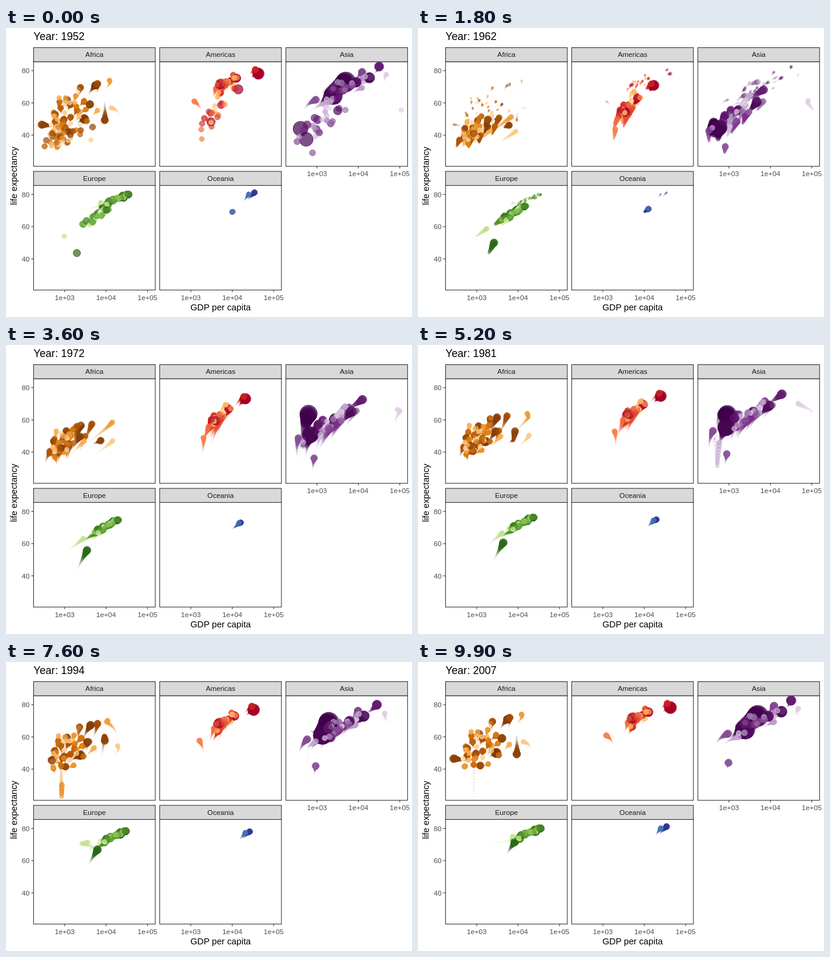
These frames come from a looping animation (672x480 px, 10 s). An HTML page with a canvas:

```html
<!DOCTYPE html>
<html lang="en">
<head>
<meta charset="utf-8">
<title>Life expectancy and GDP</title>
<style>
  html, body { margin: 0; width: 100%; height: 100%; overflow: hidden; background: #fff; }
  svg, canvas { position: absolute; left: 0; top: 0; width: 672px; height: 480px; }
  text { font-family: "Liberation Sans", Arial, sans-serif; }
</style>
</head>
<body>
<svg id="chart" viewBox="0 0 672 480"></svg>
<canvas id="dots" width="672" height="480"></canvas>
<script>
const FRAMES = 100, STEP = 100, WAKE = 50;
const PANEL = { left: 45.6, top: 56, w: 201.47, h: 173.7, dx: 208.8, dy: 205.5, strip: 23.4 };
const TEXT = 11.73, AXIS = 14.67, LINE = 1.07;

const panelX = col => PANEL.left + col * PANEL.dx;
const panelY = row => PANEL.top + row * PANEL.dy;
const xOf = (logGdp, col) => panelX(col) + (logGdp - 2.248) * 68.53;
const yOf = (life, row) => panelY(row) + PANEL.h - (life - 20.65) * 2.676;
const mix = (a, b, u) => a + (b - a) * u;

// Parabola through values at u = 0, 1/2 and 1.
const through = (a, b, c, u) =>
  a * (1 - u) * (1 - 2 * u) + b * 4 * u * (1 - u) + c * u * (2 * u - 1);

function seeded(seed) {
  return () => {
    seed = (seed * 16807) % 2147483647;
    return seed / 2147483647;
  };
}

function shade(stops, u) {
  const pos = u * (stops.length - 1), i = Math.min(Math.floor(pos), stops.length - 2);
  const part = (hex, k) => parseInt(hex.slice(1 + 2 * k, 3 + 2 * k), 16);
  const rgb = [0, 1, 2].map(k => Math.round(mix(part(stops[i], k), part(stops[i + 1], k), pos - i)));
  return `rgb(${rgb})`;
}

// The typical country lies between the poor and the rich end of its continent.
function typical(cont, rank, rnd) {
  const wealth = (cont.offset + rank * cont.step) % 1;
  const [g0, g2, l0, l2] = cont.poor.map((low, i) =>
    mix(low, cont.rich[i], mix(wealth, rnd(), cont.noise) ** cont.skew));
  return { gdp: [g0, mix(g0, g2, cont.gdpMid), g2], life: [l0, l2], bends: [] };
}

// Notable countries give GDP early, midway and late, life expectancy early and late,
// and any bends as year, half width, log GDP and life expectancy.
const notable = ([, g0, g1, g2, l0, l2, ...bends]) =>
  ({ gdp: [g0, g1, g2].map(Math.log10), life: [l0, l2], bends });

function makeTrack(cont, rank, country) {
  const pop = cont.top[rank] ?? cont.base * Math.exp(-cont.decay * (rank - cont.top.length));
  const [l0, l2] = country.life, l1 = mix(l0, l2, cont.lifeMid);
  const points = Array.from({ length: FRAMES }, (_, i) => {
    const u = i / (FRAMES - 1), year = 1952 + 55 * u;
    let gdp = through(...country.gdp, u), life = through(l0, l1, l2, u);
    for (const [mid, half, dGdp, dLife] of country.bends) {
      const k = Math.max(0, 1 - Math.abs(year - mid) / half);
      gdp += dGdp * k;
      life += dLife * k;
    }
    const size = 2 + 10 * Math.sqrt(pop * mix(cont.growth, 1, u) / 1318);
    return { x: xOf(gdp, cont.col), y: yOf(life, cont.row), size };
  });
  return { points, color: shade(cont.shades, rank / (cont.count - 1)) };
}

const chart = document.getElementById("chart");
function add(tag, attrs, content = "") {
  const el = document.createElementNS("http://www.w3.org/2000/svg", tag);
  for (const key in attrs) el.setAttribute(key, attrs[key]);
  el.textContent = content;
  chart.appendChild(el);
  return el;
}
const label = (content, x, y, size, fill, anchor = "middle", extra = {}) =>
  add("text", { x, y, "font-size": size, fill, "text-anchor": anchor, ...extra }, content);
const box = (x, y, width, height, fill) =>
  add("rect", { x, y, width, height, fill, stroke: "#333", "stroke-width": LINE });
const tick = (x1, y1, x2, y2) =>
  add("line", { x1, y1, x2, y2, stroke: "#333", "stroke-width": LINE });

function drawPanel({ name, col, row }) {
  const x = panelX(col), y = panelY(row);
  box(x, y, PANEL.w, PANEL.h, "#fff");
  box(x, y - PANEL.strip, PANEL.w, PANEL.strip, "#d9d9d9");
  label(name, x + PANEL.w / 2, y - 7.7, TEXT, "#1a1a1a");
}

function xAxis(col, row) {
  const bottom = panelY(row) + PANEL.h;
  for (let e = 3; e <= 5; e++) {
    const x = xOf(e, col);
    tick(x, bottom, x, bottom + 3.67);
    label("1e+0" + e, x, bottom + 16.3, TEXT, "#4d4d4d");
  }
}

function yAxis(row) {
  for (let life = 40; life <= 80; life += 20) {
    const y = yOf(life, row);
    tick(PANEL.left - 3.67, y, PANEL.left, y);
    label(life, PANEL.left - 6.6, y + 4.2, TEXT, "#4d4d4d", "end");
  }
}

// Countries are ranked by population, which sets both shade and size.
const tracks = [];
function addContinent(options) {
  const cont = { offset: .7, step: .618, noise: .35, skew: 1, top: [], notables: [], ...options };
  const rnd = seeded(4217);
  const countries = Array.from({ length: cont.count }, (_, rank) => typical(cont, rank, rnd));
  for (const row of cont.notables) countries[row[0]] = notable(row);
  for (let i = 0; i < cont.count; i++) {
    const rank = (i * 7) % cont.count;
    tracks.push(makeTrack(cont, rank, countries[rank]));
  }
  drawPanel(cont);
}

addContinent({
  name: "Africa", col: 0, row: 0, count: 52,
  shades: ["#7f3b08", "#b35806", "#e08214", "#fdb863", "#fee0b6"],
  top: [135, 80], base: 76, decay: .09, growth: .3,
  poor: [2.5, 2.6, 31, 41], rich: [3.45, 4.1, 52, 75],
  noise: .5, skew: 1.5, gdpMid: .65, lifeMid: .65,
  notables: [
    [1, 1419, 3000, 5581, 42, 71],
    [3, 781, 730, 278, 39, 46.5],
    [4, 4725, 8300, 9270, 45, 49.3, [1990, 16, 0, 12]],
    [9, 2449, 5300, 6223, 43, 72],
    [28, 493, 770, 863, 40, 46, [1992, 7, 0, -22]],
    [32, 2388, 19500, 12057, 43, 74, [1992, 15, -.33, 0]],
    [44, 4293, 18000, 13206, 37, 57]
  ]
});

addContinent({
  name: "Americas", col: 1, row: 0, count: 25,
  shades: ["#a50026", "#d73027", "#f46d43", "#fdae61", "#fee090"],
  top: [301, 190, 109], base: 46, decay: .14, growth: .45,
  poor: [3.2, 3.45, 38, 65], rich: [3.85, 4.25, 68, 79],
  gdpMid: .65, lifeMid: .63,
  notables: [
    [0, 13990, 24500, 42952, 68.4, 78.2],
    [5, 11367, 22500, 36319, 68.8, 80.7],
    [14, 1840, 1950, 1202, 37.6, 61]
  ]
});

addContinent({
  name: "Asia", col: 2, row: 0, count: 30,
  shades: ["#40004b", "#762a83", "#9970ab", "#c2a5cf", "#e7d4e8"],
  top: [1318, 1110], base: 223, decay: .15, growth: .4,
  poor: [2.6, 3.05, 36, 61], rich: [3.75, 4.6, 66, 82],
  skew: 1.2, gdpMid: .58, lifeMid: .64,
  notables: [
    [0, 400, 850, 4959, 44, 73, [1962, 5, 0, -8], [1972, 8, 0, 5.5]],
    [1, 547, 830, 2452, 37.4, 64.7],
    [5, 3217, 18000, 31656, 63, 82.6],
    [11, 331, 400, 944, 36, 62],
    [12, 779, 880, 975, 29, 44],
    [22, 368, 560, 1714, 39, 60, [1977, 6, 0, -20]],
    [28, 108382, 48000, 47307, 55.6, 77.6, [1970, 10, .25, 0]]
  ]
});

addContinent({
  name: "Europe", col: 0, row: 1, count: 30,
  shades: ["#276419", "#4d9221", "#7fbc41", "#b8e186", "#e6f5d0"],
  top: [82, 71, 61, 61, 58], base: 40, decay: .15, growth: .75,
  poor: [3.35, 3.85, 58, 72.5], rich: [4.1, 4.63, 73, 81.3],
  noise: .2, skew: .85, gdpMid: .65, lifeMid: .58,
  notables: [
    [1, 1969, 4250, 8458, 43.6, 71.8],
    [23, 974, 3900, 7446, 54, 75, [1992, 6, -.35, 0]]
  ]
});

addContinent({
  name: "Oceania", col: 1, row: 1, count: 2,
  shades: ["#313695", "#4575b4"],
  top: [20, 4], growth: .45, offset: 0, step: .99, noise: 0,
  poor: [4, 4.54, 69.1, 81.2], rich: [4.02, 4.4, 69.4, 80.2],
  gdpMid: .52, lifeMid: .46
});

xAxis(2, 0);
xAxis(0, 1);
xAxis(1, 1);
yAxis(0);
yAxis(1);
label("GDP per capita", 355.2, 469, AXIS, "#000");
label("life expectancy", 0, 0, AXIS, "#000", "middle", { transform: "translate(18 245.6) rotate(-90)" });
const title = label("", PANEL.left, 20, 17.6, "#000", "start");

const ctx = document.getElementById("dots").getContext("2d");
ctx.lineWidth = .945;

function drawDots(frame, fade) {
  ctx.globalAlpha = .7 * fade;
  for (const { points, color } of tracks) {
    const { x, y, size } = points[frame];
    ctx.fillStyle = ctx.strokeStyle = color;
    ctx.beginPath();
    ctx.arc(x, y, (size * fade * 2.845 + .945) / 2, 0, 2 * Math.PI);
    ctx.fill();
    ctx.stroke();
  }
}

function draw(frame) {
  title.textContent = "Year: " + Math.round(1952 + 55 * frame / (FRAMES - 1));
  ctx.clearRect(0, 0, 672, 480);
  // The wake wraps around, so the start of the loop still shows the end.
  for (let age = WAKE; age >= 0; age--) {
    drawDots((frame - age + FRAMES) % FRAMES, (1 - age / (WAKE + 1)) ** 3);
  }
}

const start = performance.now();
let shown = -1;
function update() {
  const frame = Math.floor((performance.now() - start) / STEP) % FRAMES;
  if (frame !== shown) draw(shown = frame);
  requestAnimationFrame(update);
}
update();
</script>
</body>
</html>
```
